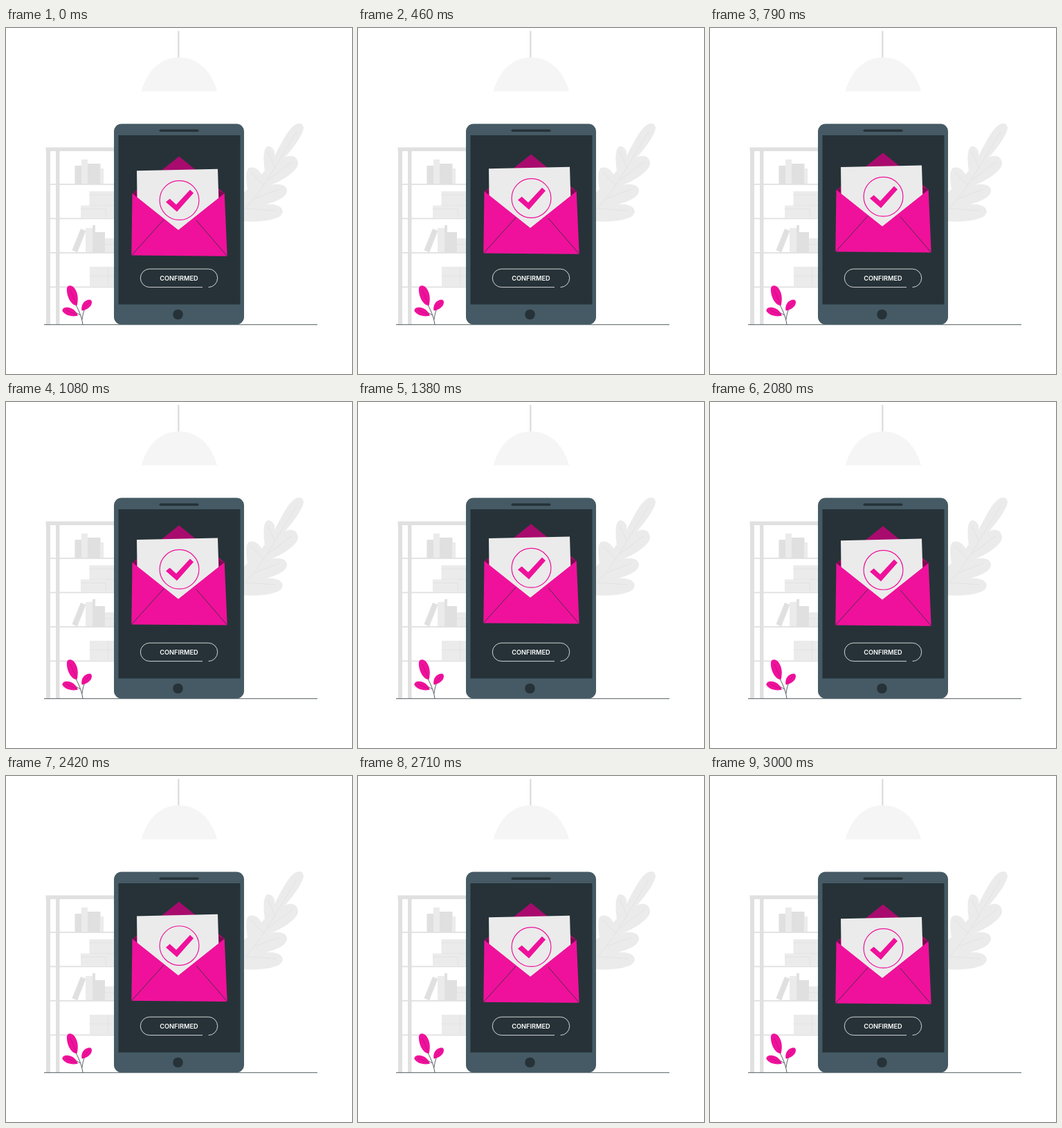
An HTML page that plays this animation: 500 px wide and 500 px high, repeating every 3.04 s.

```html
<!DOCTYPE html>
<html lang="en">
<head>
<meta charset="utf-8">
<title>Confirmed</title>
<style>
  html, body { margin: 0; width: 100%; height: 100%; overflow: hidden; background: #fff; }
  svg { display: block; width: 100vw; height: 100vh; }
  text { font: 600 9.2px Inter, sans-serif; fill: #fff; text-anchor: middle; }
  .line { fill: none; stroke: #263238; stroke-width: .8; }
  .dark { fill: #263238; }
  .pink { fill: #ef119b; }
  .mid { fill: #e0e0e0; }
  .pale { fill: #ebebeb; }
  .seam { fill: none; stroke: #e0e0e0; stroke-width: .8; }
</style>
</head>
<body>
<svg viewBox="0 0 500 500">
  <g id="lamp">
    <rect class="mid" x="248" y="4" width="2.6" height="39" rx="1.2"/>
    <path fill="#f5f5f5" d="M195.5 91.5C205 59 225 42.5 250 42.5S296 59 305 91.5Z"/>
  </g>

  <g id="shelf">
    <path class="mid" d="M57.5 172.5H160V178H57.5ZM58 178H64V428.5H58ZM72 178H77.5V428.5H72Z
      M64 225H160V226.8H64ZM64 274.5H160V276.2H64ZM64 324H160V325.7H64ZM64 373.5H160V375.2H64Z"/>
    <path class="mid" d="M99.5 199H109V225H99.5ZM118 196H136.5V225H118Z
      M95.5 321L108 290L115.5 293L103 324.5ZM125 285H129V324H125ZM129 295H143V324H129Z"/>
    <path class="pale" d="M109 190H118V225H109ZM136.5 203H141V225H136.5Z
      M120.5 236H160V256H120.5ZM108 256.5H144V274.5H108ZM144 256H160V274.5H144Z
      M115 289H125V324H115ZM143 304H160V324H143ZM121 345H160V373.5H121Z"/>
    <path class="seam" d="M132 196V225M120.5 241H160M120.5 256.3H160M108 261.5H144V274.5
      M143 312.8H160M121 358H160M147.5 345V373"/>
  </g>

  <g id="fern">
    <path class="pale" d="M340 279C360 281 390 279 398 270C404 261 394 253 375 255
      C391 251 407 244 406 234C405 226 393 224 382 227
      C397 222 424 206 422 194C420 184 411 183 403 187
      C414 175 428 156 430 145C430 137 422 136 416 141C406 149 397 168 388 185
      C390 177 384 170 378 171C371 174 372 192 374 206L369 212
      C366 204 357 199 350 203C346 207 347 222 349 233L340 240Z"/>
    <path class="seam" d="M340 266C366 243 390 198 420 150M374 228L353 208M360 246L395 233
      M389 202L378 178M378 220L414 193M346 261L390 264"/>
  </g>

  <path class="line" d="M55 428.7H450"/>

  <g id="sprout">
    <path class="line" d="M111 428.5C109 415 104 406 99 396M107 415C105 413 101 411 95 409M110 421C111 414 112 408 117 400"/>
    <path class="pink" d="M102.5 401C94 401 87 387 88 376C89 371 95 371 99 376C104 383 105 392 102.5 401Z
      M104 415.5C95 418 85 415 81.5 409C81 403 89 403 94 405C99 407 102 411 104 415.5Z
      M109.5 408.5C108 401 112 393 121 392.5C125 393 125 399 121 403C117 407 113 408 109.5 408.5Z"/>
    <path class="line" style="stroke:#a80b6d;stroke-width:.5" d="M102 400L93 379M103 415L86 407M110 408L121 395"/>
  </g>

  <g id="phone">
    <rect x="156" y="138.5" width="188" height="290" rx="11" fill="#455a64"/>
    <rect class="dark" x="162.5" y="155" width="176" height="244.5"/>
    <rect class="dark" x="221.5" y="146.5" width="57" height="3.6" rx="1.8"/>
    <circle class="dark" cx="248.5" cy="414" r="7.3"/>
    <path fill="none" stroke="#fff" stroke-width=".8" d="M284 374.6H207.5A13.2 13.2 0 0 1 207.5 348.2H292.5A13.2 13.2 0 0 1 292.5 374.6"/>
    <text x="250" y="365">CONFIRMED</text>
  </g>

  <g id="envelope">
    <path fill="#a80b6d" d="M182 240L250 185.5L316 239L249 292Z"/>
    <path fill="#7d0a52" d="M182 240L189 236V246ZM316 239L307 235V246Z"/>
    <path class="pale" d="M189 206.3L306 203.7L307.3 246L249 292.5L189.5 246Z"/>
    <g id="tick">
      <circle cx="250.5" cy="249" r="28.4" fill="none" stroke="#ef119b" stroke-width="1.2"/>
      <path class="pink" d="M231 251.5L236.7 246.7L246 255.2L266 233.7L271 238.4L247 265.5Z"/>
    </g>
    <path class="pink" d="M182.5 239L249 292L315.7 239L319.7 329.8L181.3 328.6Z"/>
    <path class="line" d="M181.5 328.5L228 277M319.5 329.5L275 278"/>
  </g>
</svg>
<script>
  const envelope = document.getElementById('envelope');
  const LOOP = 3040, FLOAT = 3000, LIFT = 10;

  function draw() {
    // steady rise and fall, then a short rest before the loop restarts
    const t = Math.min(performance.now() % LOOP, FLOAT);
    const y = -LIFT * (1 - Math.abs(2 * t / FLOAT - 1));
    envelope.setAttribute('transform', `translate(0 ${y})`);
    requestAnimationFrame(draw);
  }
  draw();
</script>
</body>
</html>
```
